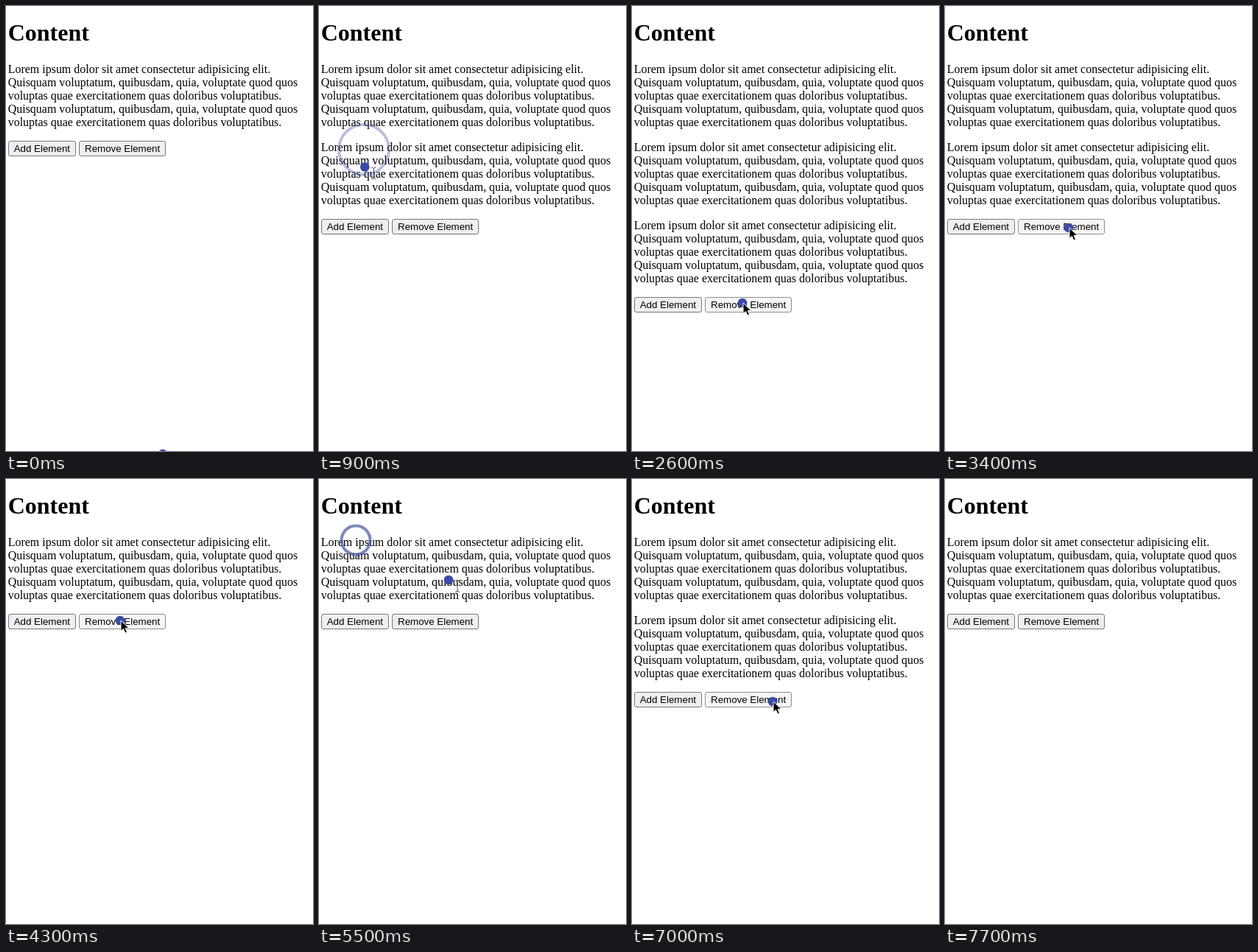
Recreate the animation shown at these times as an HTML page. Size 417 by 604 pixels, loop 8 s.

```html
<!DOCTYPE html>
<html lang="en">
<head>
<meta charset="utf-8">
<title>Content</title>
<style>
html, body { margin: 0; width: 100%; height: 100%; overflow: hidden; background: #fff; }
body { position: relative; color: #000; font: 15.98px/18px "Liberation Serif", "Times New Roman", serif; white-space: nowrap; cursor: default; }
h1, p, #bar { position: absolute; left: 2.7px; margin: 0; }
h1 { top: 18px; font-size: 32px; line-height: 37px; }
#bar { display: flex; gap: 4px; }
button { margin: 0; padding: 2px 7px; border: 1px solid #767676; border-radius: 3px; background: #efefef; color: #000; font: 13.3333px/15px "Liberation Sans", Arial, sans-serif; pointer-events: none; }
button.pressed { background: #f5f5f5; border-color: #8d8d8d; }
svg { position: absolute; left: 0; top: 0; width: 100%; height: 100%; pointer-events: none; }
</style>
</head>
<body>
<h1>Content</h1>
<div id="list"></div>
<div id="bar"><button tabindex="-1">Add Element</button><button tabindex="-1">Remove Element</button></div>
<svg>
  <circle id="ring" fill="none" stroke="#3f51a0" stroke-width="4"/>
  <g id="pointer">
    <circle r="6.3" fill="#3a4ba8"/>
    <path id="arrow" d="M1 0V14.5L4.4 11.4 6.9 17 9.5 15.9 7.1 10.4H12Z" fill="#000" stroke="#fff"/>
    <path id="beam" d="M9 .5Q12 .5 12 2.5Q12 .5 15 .5M12 2V15M9 16.5Q12 16.5 12 14.5Q12 16.5 15 16.5" fill="none" stroke="#555"/>
  </g>
</svg>
<script>
const LOOP = 8000, STEP = 100;
const TOP = 77, PITCH = 106, TEXT_HEIGHT = 90, TEXT_RIGHT = 397;
const TRAVEL = 600, PRESS = 100, RING_LIFE = 210;
const $ = id => document.getElementById(id);
const show = (el, on) => { el.style.display = on ? "" : "none"; };

const pair = "<br>Quisquam voluptatum, quibusdam, quia, voluptate quod quos" +
  "<br>voluptas quae exercitationem quas doloribus voluptatibus.";
const paras = [0, 1, 2].map(i => {
  const p = document.createElement("p");
  p.innerHTML = "Lorem ipsum dolor sit amet consectetur adipisicing elit." + pair + pair;
  p.style.top = TOP + i * PITCH + "px";
  return $("list").appendChild(p);
});
const [addButton, removeButton] = document.querySelectorAll("button");

// Where the pointer goes; change is +1 for an add click, -1 for a remove click
const stop = (time, x, y, change = 0) => ({ time, x, y, change });
const stops = [
  stop(0, 213, 608),
  stop(700, 61, 195, 1),
  stop(1700, 67, 307, 1),
  stop(2700, 150, 403, -1),
  stop(3500, 168, 301, -1),
  stop(4400, 155, 192, -1),
  stop(5400, 50, 83, 1),
  stop(5500, 176, 137),
  stop(6300, 61, 196, 1),
  stop(7100, 191, 302, -1),
  stop(LOOP, 215, 625)
];
const clicks = stops.filter(s => s.change);

const ease = p => p * p * p * (10 + p * (6 * p - 15));

// Leaves each stop at once, arrives a moment before the next click and waits
function pointerAt(t) {
  const i = stops.findIndex(s => s.time > t);
  const from = stops[i - 1], to = stops[i];
  const travel = Math.max(PRESS, Math.min(TRAVEL, to.time - from.time - PRESS));
  const e = ease(Math.min(1, (t - from.time) / travel));
  return [from.x + (to.x - from.x) * e, from.y + (to.y - from.y) * e];
}

function drawRing(t, click) {
  const age = click ? t - click.time : Infinity;
  show($("ring"), age <= RING_LIFE);
  if (age > RING_LIFE) return;
  const attrs = { cx: click.x, cy: click.y, r: 5 + 0.145 * age, opacity: 1 - 0.0032 * age };
  for (const name in attrs) $("ring").setAttribute(name, attrs[name]);
}

function draw(t) {
  const done = clicks.filter(c => c.time <= t);
  const count = done.reduce((n, c) => n + c.change, 1);
  const barTop = TOP + count * PITCH;
  paras.forEach((p, i) => show(p, i < count));
  $("bar").style.top = barTop + "px";

  const next = clicks[done.length];
  const pressed = next && next.time - t <= PRESS ? next.change : 0;
  addButton.classList.toggle("pressed", pressed > 0);
  removeButton.classList.toggle("pressed", pressed < 0);

  const [x, y] = pointerAt(t);
  const onText = y >= TOP && y < barTop && (y - TOP) % PITCH < TEXT_HEIGHT && x < TEXT_RIGHT;
  show($("arrow"), !onText);
  show($("beam"), onText);
  $("pointer").setAttribute("transform", `translate(${x} ${y})`);
  drawRing(t, done[done.length - 1]);
}

const start = performance.now();
function tick() {
  const t = (performance.now() - start) % LOOP;
  draw(Math.floor(t / STEP) * STEP);
  requestAnimationFrame(tick);
}
tick();
</script>
</body>
</html>
```
